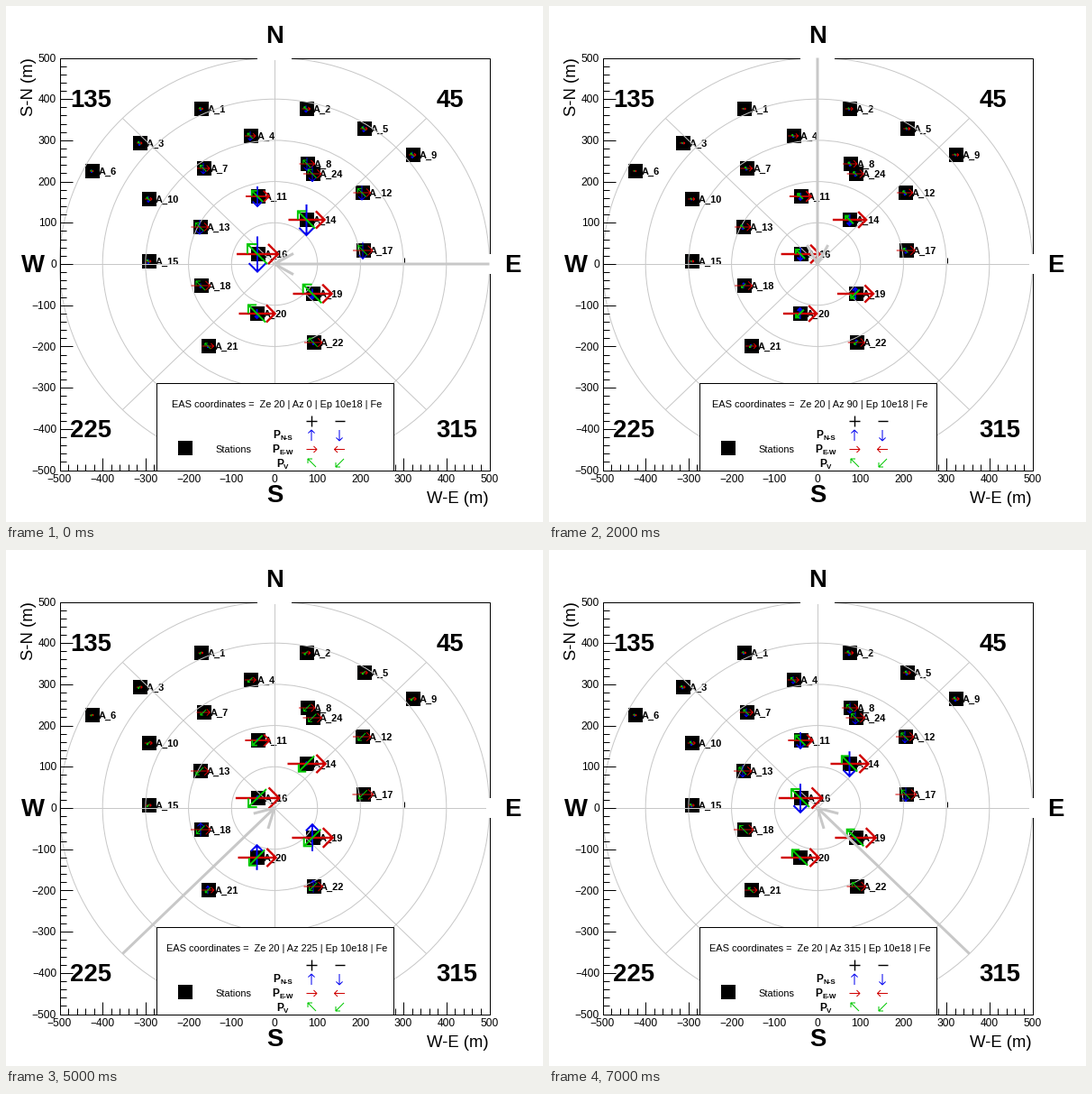
These frames come from a looping animation (596 px wide and 572 px high, 8 s). A matplotlib script:

```python
import numpy as np
import matplotlib.pyplot as plt
from matplotlib.animation import FuncAnimation
from matplotlib.patches import Rectangle, Ellipse

W, H, DPI = 596, 572, 100
PT = 72 / DPI  # points per pixel
CX, CY, SX, SY = 298, 286, 0.477, 0.457  # core position, pixels per metre
BLACK, GRID, SHOWER = "black", "#c8c8c8", "#c8c8c8"
BLUE, RED, GREEN = "#0000f0", "#d00000", "#00c800"

# id: x, y in pixels and half length of the east-west arrow
STATIONS = {
    1: (216, 114, 2.5), 2: (333, 114, 4.5), 3: (148, 152, 3), 4: (271, 144, 6),
    5: (397, 136, 4), 6: (95, 183, 2), 7: (219, 180, 7), 8: (334, 175, 8.5),
    9: (451, 165, 4), 10: (158, 214, 4), 11: (279, 211, 13),
    12: (395, 207, 9.5), 13: (215, 245, 9.5), 14: (333.5, 237, 20),
    15: (158, 283, 3), 16: (279, 275, 23), 17: (396, 271, 11),
    18: (216, 310, 10.5), 19: (340, 319, 21.5), 20: (278.5, 341, 20),
    21: (224, 377, 6.5), 22: (341, 373, 10), 24: (340, 186, 10),
}

plt.rcParams["font.family"] = "Liberation Sans"
fig = plt.figure(figsize=(W / DPI, H / DPI), dpi=DPI, facecolor="white")
ax = fig.add_axes([0, 0, 1, 1])
ax.set_xlim(0, W)
ax.set_ylim(H, 0)
ax.axis("off")


def label(x, cy, s, size, ha="center", bold=False, z=6):
    return ax.text(x, cy + 0.345 * size, s, fontsize=size * PT, ha=ha,
                   va="baseline", color=BLACK, zorder=z,
                   fontweight="bold" if bold else "normal")


def line(xs, ys, color=BLACK, width=1.0, z=3):
    return ax.plot(xs, ys, color=color, lw=width * PT, zorder=z,
                   solid_capstyle="butt", solid_joinstyle="miter")[0]


def box(x0, y0, x1, y1, face, edge="none", z=1):
    ax.add_patch(Rectangle((x0, y0), x1 - x0, y1 - y0, facecolor=face,
                           edgecolor=edge, lw=PT, zorder=z))


def arrow(tail, tip, color, width, head, opening=45, z=5):
    """Shaft plus an open head of two barbs."""
    (x0, y0), (x1, y1) = tail, tip
    back = np.arctan2(y0 - y1, x0 - x1)
    a, b = back + np.radians(opening), back - np.radians(opening)
    xs = [x0, x1, np.nan, x1 + head * np.cos(a), x1, x1 + head * np.cos(b)]
    ys = [y0, y1, np.nan, y1 + head * np.sin(a), y1, y1 + head * np.sin(b)]
    return line(xs, ys, color, width, z)


def centred(x, y, dx, dy, color, width):
    head = 0.68 * np.hypot(dx, dy)
    return arrow((x - dx, y - dy), (x + dx, y + dy), color, width, head)


def draw_grid():
    for r in range(100, 501, 100):
        ax.add_patch(Ellipse((CX, CY), 2 * r * SX, 2 * r * SY, fill=False,
                             edgecolor=GRID, lw=PT, zorder=3))
    for a in np.radians(np.arange(0, 180, 45)):
        dx, dy = 500 * SX * np.cos(a), 500 * SY * np.sin(a)
        line([CX - dx, CX + dx], [CY + dy, CY - dy], GRID)
    line([441.5, 441.5], [279, 285])


def draw_axes():
    box(59.5, 57.5, 536.5, 514.5, "none", BLACK, 3)
    box(279, 20, 317, 60, "white", z=3.2)
    box(533, 275, 548, 297, "white", z=3.2)
    for v in range(-500, 501, 20):
        size = 14 if v % 100 == 0 else 7
        x, y = CX + v * SX, CY - v * SY
        line([x, x], [514.5, 514.5 - size])
        line([59.5, 59.5 + size], [y, y])
    for v in range(-500, 501, 100):
        s = str(v).replace("-", "\u2212")
        label(CX + v * SX, 524, s, 12)
        label(56, CY - v * SY, s, 12, "right")
    label(536, 545, "W-E (m)", 18.5, "right")
    ax.text(25, 57, "S-N (m)", fontsize=18.5 * PT, rotation=90,
            ha="center", va="top")
    for x, y, s in [(298.5, 31.5, "N"), (298, 541, "S"), (30, 286, "W"),
                    (562, 286, "E"), (493, 103, "45"), (94.5, 103, "135"),
                    (94.5, 469, "225"), (500, 469, "315")]:
        label(x, y, s, 27.5, bold=True)


def draw_legend():
    box(166.5, 417.5, 429.5, 514.5, "white", BLACK, 3.5)
    box(191, 482, 207, 498, BLACK, z=4)
    label(232, 491.5, "Stations", 11, "left")
    line([333, 345], [459.5, 459.5], width=1.4, z=4)
    line([339, 339], [453.5, 465.5], width=1.4, z=4)
    line([365, 376], [459.5, 459.5], width=1.4, z=4)
    for y, sub, left in [(475, "N-S", 304.5), (491, "E-W", 303), (506.5, "V", 308)]:
        label(left, y, "P", 12, "right", True)
        label(left, y + 3.5, sub, 8, "left", True)
    for tail, tip, color in [
            ((339, 482), (339, 470), BLUE), ((370, 470), (370, 482), BLUE),
            ((333.5, 491.5), (345, 491.5), RED), ((376, 491.5), (364.5, 491.5), RED),
            ((344, 511), (335, 502), GREEN), ((375, 502), (366, 511), GREEN)]:
        arrow(tail, tip, color, 1, 5)


def draw_stations():
    for n, (x, y, _) in STATIONS.items():
        x = round(x + 0.6)
        box(x - 8, y - 8, x + 8, y + 8, BLACK)
        label(x + 6.5, y + 0.5, f"A_{n}", 11, "left", True, z=2)


draw_grid()
draw_axes()
draw_legend()
draw_stations()
header = label(300.5, 441, "", 11)
moving = []


def update(i):
    while moving:
        moving.pop().remove()
    az = 45 * i
    c, s = np.cos(np.radians(az)), np.sin(np.radians(az))
    header.set_text(f"EAS coordinates =  Ze 20 | Az {az} | Ep 10e18 | Fe")
    for x, y, size in STATIONS.values():
        side = 1 if y < CY else -1
        width = 2.4 if size > 17 else 1.8 if size > 12 else 1
        east = size * (1 - 0.07 * s)
        north = -size * (0.55 * c + 0.3 * side)
        if abs(c) > 0.1:
            vert = 0.48 * size * np.sign(c) * abs(c) ** 0.3
        else:
            vert = 0.22 * size * side
        moving.append(centred(x, y, 0, -north, BLUE, min(width, 2)))
        moving.append(centred(x, y, east, 0, RED, width))
        moving.append(centred(x, y, -abs(vert), -vert, GREEN, min(width, 2)))
    start = CX + 500 * SX * c, CY - 500 * SY * s
    moving.append(arrow(start, (CX, CY), SHOWER, 3, 24, 29, z=7))
    return moving


anim = FuncAnimation(fig, update, frames=8, interval=1000, repeat=True,
                     repeat_delay=0, init_func=lambda: update(0), blit=False)
plt.show()
```
